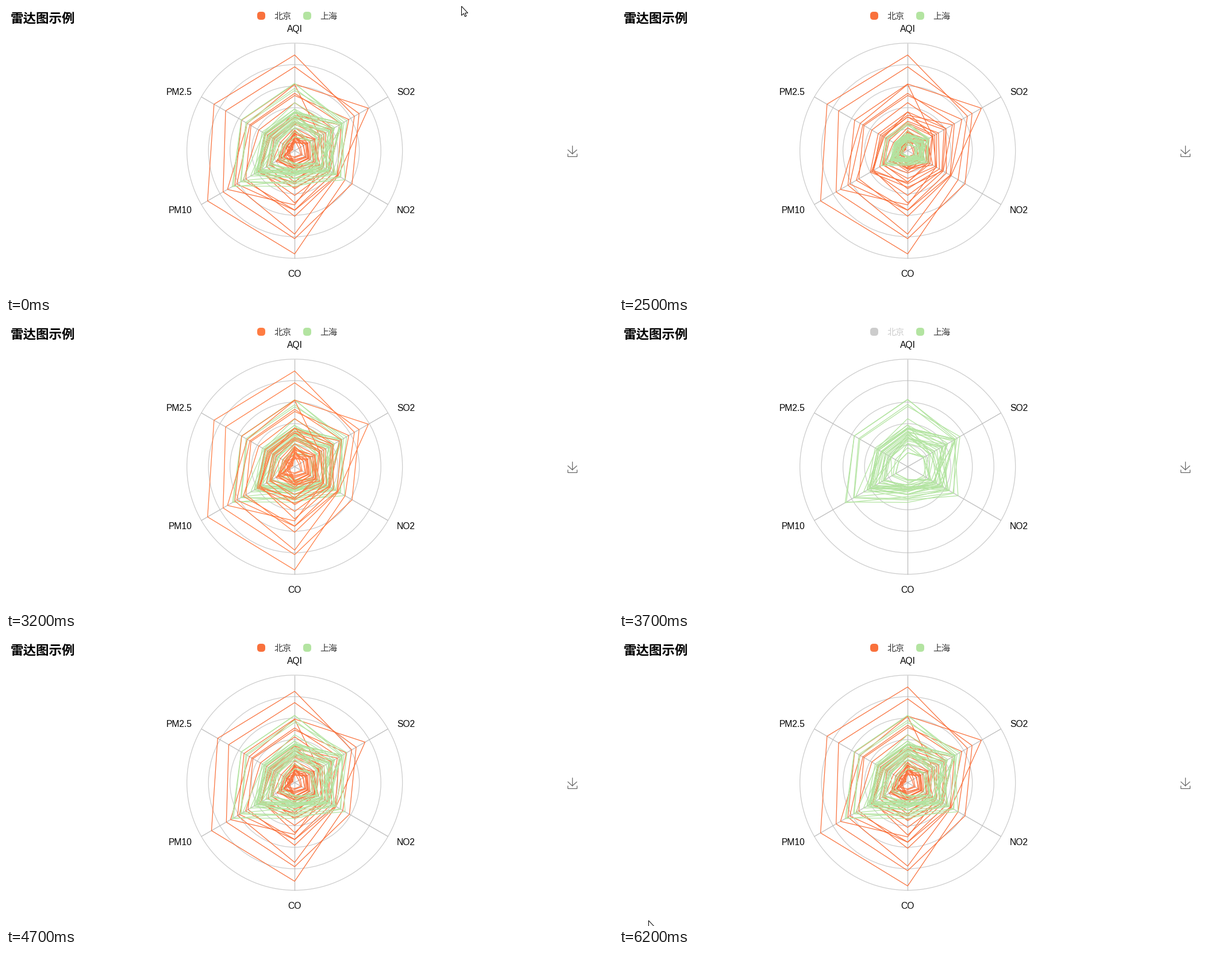
Animation, 1056 px wide and 502 px high, one loop 6.5 s. Source, as a matplotlib script:

```python
import numpy as np
import matplotlib.pyplot as plt
from matplotlib.animation import FuncAnimation
from matplotlib.collections import LineCollection
from matplotlib.patches import Circle, FancyBboxPatch, Polygon

W, H, DPI = 1056, 502, 64  # a power of two keeps the pixel size exact
STEP, FRAMES = 100, 65
PX = 72 / DPI
CX, CY, R = 502.2, 252.2, 187.5
ORANGE, ORANGE_LIT = "#f9713c", "#ff7c42"
GREEN, GREEN_LIT = "#b3e4a1", "#c5fbb1"
OFF, DARK = "#cccccc", "#333333"
CJK = "Noto Sans CJK JP"

# Columns: AQI, PM2.5, PM10, CO, NO2, SO2
LIMITS = np.array([300, 250, 300, 5, 200, 100])
ANGLES = np.radians(90 + 60 * np.arange(6))
DIRS = np.column_stack([np.cos(ANGLES), -np.sin(ANGLES)])

BEIJING_HIGH = [
    [82, 58, 90, 1.77, 68, 33],
    [74, 49, 77, 1.46, 48, 27],
    [78, 55, 80, 1.29, 59, 29],
    [267, 216, 280, 4.8, 108, 64],
    [185, 127, 216, 2.52, 61, 27],
    [64, 38, 74, 1.04, 46, 22],
    [108, 79, 120, 1.7, 75, 41],
    [108, 63, 116, 1.48, 44, 26],
    [94, 66, 110, 1.54, 62, 31],
    [186, 142, 192, 3.88, 93, 79],
    [57, 31, 54, 0.96, 32, 14],
    [94, 69, 114, 2.08, 73, 39],
    [99, 73, 110, 2.43, 76, 48],
    [154, 117, 157, 3.05, 92, 58],
    [234, 185, 230, 4.09, 123, 69],
    [160, 120, 186, 2.77, 91, 50],
    [134, 96, 165, 2.76, 83, 41],
]
SHANGHAI_MAIN = [
    [109, 81, 121, 1.28, 68, 51],
    [106, 77, 114, 1.07, 55, 51],
    [91, 45, 125, 0.82, 34, 23],
    [65, 27, 78, 0.86, 45, 29],
    [83, 60, 84, 1.09, 73, 27],
    [53, 33, 47, 0.64, 50, 17],
    [117, 81, 124, 1.03, 45, 24],
    [99, 71, 142, 1.1, 62, 42],
    [95, 69, 130, 1.28, 74, 50],
    [116, 87, 131, 1.47, 84, 40],
    [108, 80, 121, 1.3, 85, 37],
    [134, 83, 167, 1.16, 57, 43],
    [79, 43, 107, 1.05, 59, 37],
    [104, 77, 119, 1.09, 73, 48],
    [168, 128, 172, 1.49, 97, 56],
    [65, 45, 51, 0.74, 39, 17],
    [39, 24, 38, 0.61, 47, 17],
    [39, 24, 39, 0.59, 50, 19],
    [188, 143, 197, 1.66, 99, 51],
    [174, 131, 174, 1.55, 108, 50],
    [187, 143, 201, 1.39, 89, 53],
]


def clean_days(rng, n=14):
    """Low-pollution days, all driven by PM2.5 and AQI."""
    pm = np.linspace(5, 27, n)
    aqi = rng.permutation(np.linspace(22, 56, n))
    co = 0.15 + 0.028 * pm + rng.uniform(-0.05, 0.12, n)
    no2 = 4 + 1.7 * pm + rng.uniform(-3, 5, n)
    so2 = 1.5 + 0.75 * pm + rng.uniform(-1, 2, n)
    return np.column_stack([aqi, pm, 1.3 * aqi - 13, co, no2, so2])


def middling_days(rng, n=8):
    pm = np.linspace(46, 71, n)
    pm10 = 1.4 * pm + 10 + rng.uniform(-8, 6, n)
    co = 0.6 + 0.006 * pm + rng.uniform(-0.1, 0.15, n)
    no2 = rng.permutation(np.linspace(51, 88, n))
    so2 = rng.permutation(np.linspace(24, 41, n))
    return np.column_stack([1.1 * pm + 21, pm, pm10, co, no2, so2])


def outlines(rows):
    """Closed polygons around the origin, in pixels."""
    pts = R * (rows / LIMITS)[:, :, None] * DIRS
    return np.concatenate([pts, pts[:, :1]], axis=1)


rng = np.random.default_rng(7)
beijing = outlines(np.vstack([BEIJING_HIGH, clean_days(rng)]))
shanghai = outlines(np.vstack([SHANGHAI_MAIN, SHANGHAI_MAIN[:2], middling_days(rng)]))

fig = plt.figure(figsize=(W / DPI, H / DPI), dpi=DPI, facecolor="white")
ax = fig.add_axes([0, 0, 1, 1])
ax.set_xlim(0, W)
ax.set_ylim(H, 0)
ax.axis("off")


def label(x, y, s, size=15.6, font="Liberation Sans", color="black", **kw):
    return ax.text(x, y, s, fontsize=size * PX, fontfamily=font, color=color,
                   va="baseline", **kw)


def stroke(xs, ys, color, z=1):
    ax.plot(xs, ys, color=color, lw=1.25 * PX, zorder=z, solid_capstyle="butt",
            solid_joinstyle="miter")


def legend_item(x, name):
    mark = FancyBboxPatch((x + 5.5, 15.5), 3, 3, lw=0, zorder=6,
                          boxstyle="round,pad=5.5,rounding_size=5.5")
    ax.add_patch(mark)
    return mark, label(x + 29, 22.5, name, 15, CJK, DARK)


def web():
    lines = LineCollection([], linewidths=1.25 * PX, joinstyle="bevel")
    ax.add_collection(lines, autolim=False)
    return lines


# Radar grid
for k in range(1, 6):
    ax.add_patch(Circle((CX, CY), R * k / 5, fill=False, ec="#cccccc",
                        lw=1.25 * PX, zorder=1))
for dx, dy in DIRS:
    stroke([CX, CX + R * dx], [CY, CY + R * dy], "#bbbbbb")

label(8, 29, "雷达图示例", 22.5, CJK, weight="bold")
label(502, 45.5, "AQI", ha="center")
label(323.5, 155, "PM2.5", ha="right")
label(323.5, 361, "PM10", ha="right")
label(502, 472, "CO", ha="center")
label(680, 361, "NO2")
label(680, 155, "SO2")

# Download icon
for path in ([(4.7, 22.9), (29.3, 45.5), (54.7, 23.4)],
             [(4.6, 43.6), (4.6, 58), (53.8, 58), (53.8, 43.6)],
             [(29.2, 45.1), (29.2, 0)]):
    xs, ys = np.array(path).T * 0.323
    stroke(xs + 975.7, ys + 243, "#666666")

beijing_key = legend_item(437, "北京")
shanghai_key = legend_item(517, "上海")
beijing_web, shanghai_web = web(), web()

ARROW = np.array([(0.5, 0.5), (0.5, 16.5), (4.2, 13), (6.6, 18.5), (8.9, 17.5),
                  (6.6, 12.2), (11.5, 12.2)])
cursor = Polygon(ARROW, closed=True, fc="white", ec="black", lw=PX, zorder=10)
ax.add_patch(cursor)

EXIT_T = [5100, 5300, 5500, 5600, 5800, 6000, 6200]
EXIT_X = [170, 82, 39, 33, 34, 43, 51]
EXIT_Y = [23, 175, 312, 362, 430, 470, 492]


def grow(ms):
    """Exponential ease-out over 1050 ms."""
    return 1.0 if ms >= 1050 else 1 - 2 ** (-10 * ms / 1050)


def show(lines, key, shape, scale, color, on, z):
    mark, text = key
    lines.set_visible(on)
    lines.set_segments(list(shape * scale + (CX, CY)))
    lines.set_color(color)
    lines.set_zorder(z)
    mark.set_facecolor(color if on else OFF)
    text.set_color(DARK if on else OFF)


def draw(i):
    t = i * STEP
    lit = 2900 <= t < 3700
    show(beijing_web, beijing_key, beijing,
         grow(t - 4231) if t >= 4300 else 1,
         ORANGE_LIT if lit else ORANGE, not 3700 <= t < 4300, 5 if lit else 3)
    show(shanghai_web, shanghai_key, shanghai,
         grow(t - 2418) if t >= 2500 else 1,
         GREEN_LIT if 1100 <= t < 1600 else GREEN, not 1600 <= t < 2500, 4)

    cursor.set_visible(t == 0 or t >= EXIT_T[0])
    if t == 0:
        spot = (792, 0)
    else:
        spot = (np.interp(t, EXIT_T, EXIT_X), np.interp(t, EXIT_T, EXIT_Y))
    cursor.set_xy(ARROW + spot)
    return beijing_web, shanghai_web, cursor


anim = FuncAnimation(fig, draw, frames=FRAMES, interval=STEP, repeat=True,
                     repeat_delay=0, blit=False)
plt.show()
```
